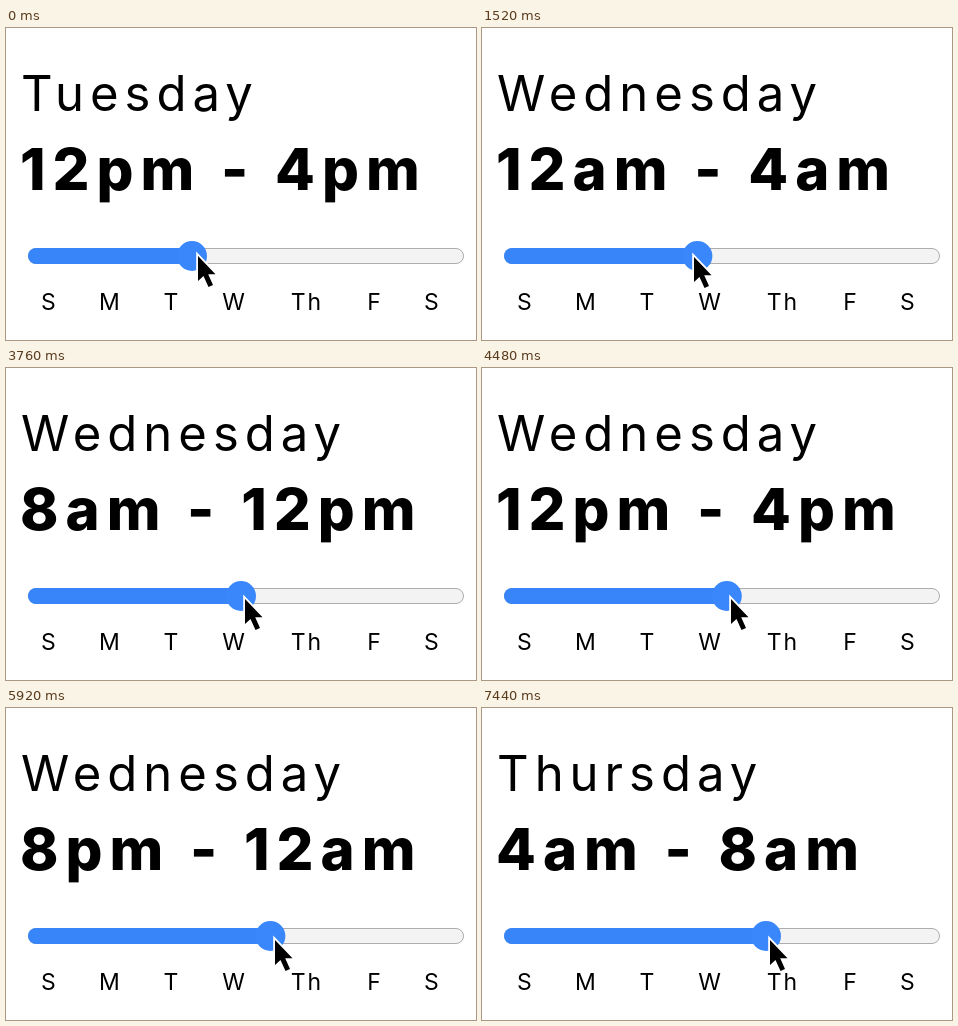
These frames come from a looping animation (470 px wide and 312 px high, 8000 ms). An HTML page:

```html
<!DOCTYPE html>
<html lang="en">
<head>
<meta charset="utf-8">
<title>Time slot slider</title>
<style>
  html, body { margin: 0; width: 100%; height: 100%; overflow: hidden; background: #fff; }
  svg { display: block; width: 470px; height: 312px; font-family: Inter, "Open Sans", sans-serif; }
  #day { font-size: 49px; letter-spacing: 6px; }
  #hours { font-size: 58px; font-weight: 800; letter-spacing: 7px; }
  #labels { font-size: 23px; letter-spacing: 2px; text-anchor: middle; }
</style>
</head>
<body>
<svg viewBox="0 0 470 312">
  <text id="day" x="15" y="83"></text>
  <text id="hours" x="14" y="162"></text>
  <rect x="22.5" y="220.5" width="435" height="15" rx="7.5" fill="#f3f3f3" stroke="#adadad"/>
  <rect id="fill" x="22" y="220" height="16" rx="8" fill="#3785f8"/>
  <circle id="thumb" cy="228" r="15" fill="#3a87fb"/>
  <g id="labels"></g>
  <path id="cursor" d="M0 0V25L5.5 20L10.5 31L15 29L10.2 18.3H17.5Z"
        stroke="#fff" stroke-width="3.6" paint-order="stroke"/>
</svg>
<script>
const LOOP = 8000;
const DAYS = ['Sunday', 'Monday', 'Tuesday', 'Wednesday', 'Thursday', 'Friday', 'Saturday'];
const HOURS = ['12am', '4am', '8am', '12pm', '4pm', '8pm'];
const LABELS = [['S', 43.5], ['M', 104.5], ['T', 166], ['W', 228.5], ['Th', 301], ['F', 369], ['S', 426.5]];

// start time, four-hour slot of the week, pointer x, pointer y
const STEPS = [
  [0, 15, 192, 228], [720, 16, 199, 229], [1520, 18, 212, 229], [2240, 19, 223, 230],
  [2960, 19, 230, 230], [3760, 20, 239, 231], [4480, 21, 249, 231], [5200, 22, 259, 231],
  [5920, 23, 269, 232], [6720, 24, 279, 232], [7440, 25, 288, 232]
];

const el = id => document.getElementById(id);
el('labels').innerHTML = LABELS.map(([name, x]) => `<text x="${x}" y="282">${name}</text>`).join('');

let shown;
function show(step) {
  if (step === shown) return;
  shown = step;
  const [, slot, x, y] = step;
  const thumbX = 39 + 9.8 * slot;
  el('day').textContent = DAYS[Math.floor(slot / 6)];
  el('hours').textContent = `${HOURS[slot % 6]} - ${HOURS[(slot + 1) % 6]}`;
  el('fill').setAttribute('width', thumbX - 22);
  el('thumb').setAttribute('cx', thumbX);
  el('cursor').setAttribute('transform', `translate(${x} ${y})`);
}

function frame() {
  const time = performance.now() % LOOP;
  show(STEPS.findLast(([start]) => start <= time));
  requestAnimationFrame(frame);
}
frame();
</script>
</body>
</html>
```
